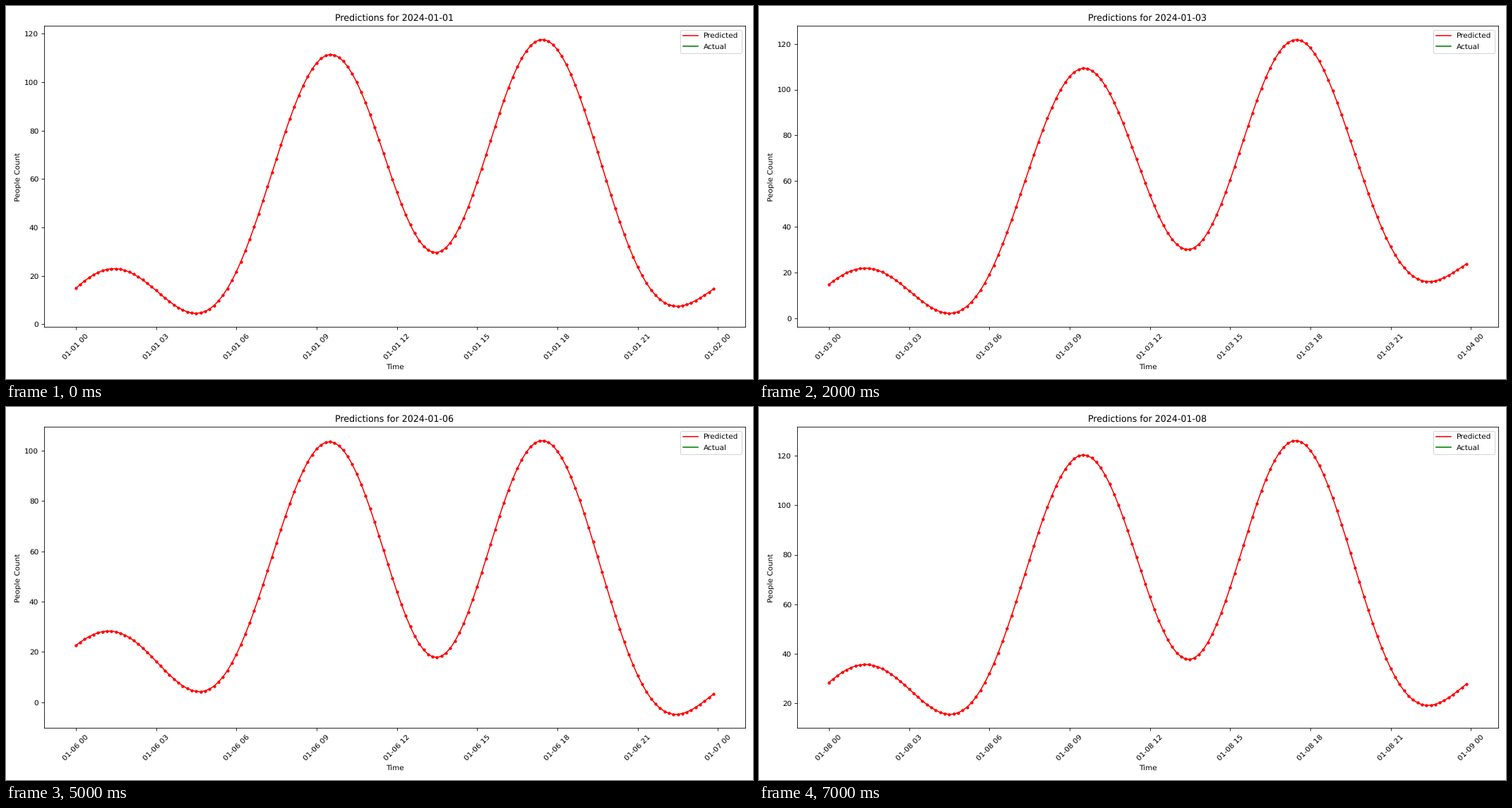
A matplotlib script for the animation above (8 s loop, 1058 px wide and 529 px high).

```python
import numpy as np
import matplotlib.pyplot as plt
from matplotlib.animation import FuncAnimation

W, H = 1058, 529
DPI = W / 14
DAYS = 8

plt.rcParams["font.family"] = "DejaVu Sans"
plt.rcParams["text.hinting"] = "none"

# Daily rhythm: mean, then cosine and sine weights of four harmonics.
MEAN = 45.12
COS = [-28.93, -15.26, 13.57, 0.36]
SIN = [-16.31, -14.7, 29.92, -3.19]

# Slow drift at each midnight and noon, with one guide point past either end.
DRIFT = [-28.5, 0, 9.05, 0.9, -8.55, -0.1, 8.35, 10.2, -5.55, -10.3,
         0.05, 7.7, -1.55, -10.3, -4.5, 13.5, 17.35, 14.4, 24]


def daily(hours):
    angle = 2 * np.pi * hours / 24
    return MEAN + sum(a * np.cos(k * angle) + b * np.sin(k * angle)
                      for k, (a, b) in enumerate(zip(COS, SIN), 1))


def natural_spline(knots, values):
    """Cubic curve through the points, as a sum of |x - knot|^3 terms."""
    def cubes(x):
        return np.abs(x[:, None] - knots) ** 3

    def line(x):
        return np.column_stack([np.ones_like(x), x])

    tail = line(knots)
    system = np.block([[cubes(knots), tail], [tail.T, np.zeros((2, 2))]])
    weights = np.linalg.solve(system, np.append(values, [0, 0]))
    return lambda x: np.hstack([cubes(x), line(x)]) @ weights


drift = natural_spline(np.arange(len(DRIFT)) - 1.0, DRIFT)
hours = np.arange(144) / 6


def predict(day):
    return daily(hours) + drift(2 * day + hours / 12)


def tick_label(day, hour):
    return f"01-{day + 1 + hour // 24:02d} {hour % 24:02d}"


fig, ax = plt.subplots(figsize=(W / DPI, H / DPI), dpi=DPI)
fig.subplots_adjust(left=53.7 / W, right=1047.2 / W,
                    bottom=1 - 455.3 / H, top=1 - 28.3 / H)


def draw(day):
    ax.clear()
    count = predict(day)
    ax.plot(hours, count, color="red", label="Predicted")
    ax.scatter(hours, count, s=10, color="red")
    ax.plot([], [], color="green", label="Actual")
    ax.set_title(f"Predictions for 2024-01-{day + 1:02d}", pad=6.6)
    ax.set_xlabel("Time", labelpad=4.5)
    ax.set_ylabel("People Count", labelpad=4.5)
    ticks = range(0, 25, 3)
    ax.set_xticks(ticks, [tick_label(day, h) for h in ticks], rotation=45)
    ax.yaxis.set_major_locator(plt.MultipleLocator(20))
    ax.legend(loc="upper right", labelspacing=0.57)


anim = FuncAnimation(fig, draw, frames=DAYS, interval=1000, repeat=True)
plt.show()
```
